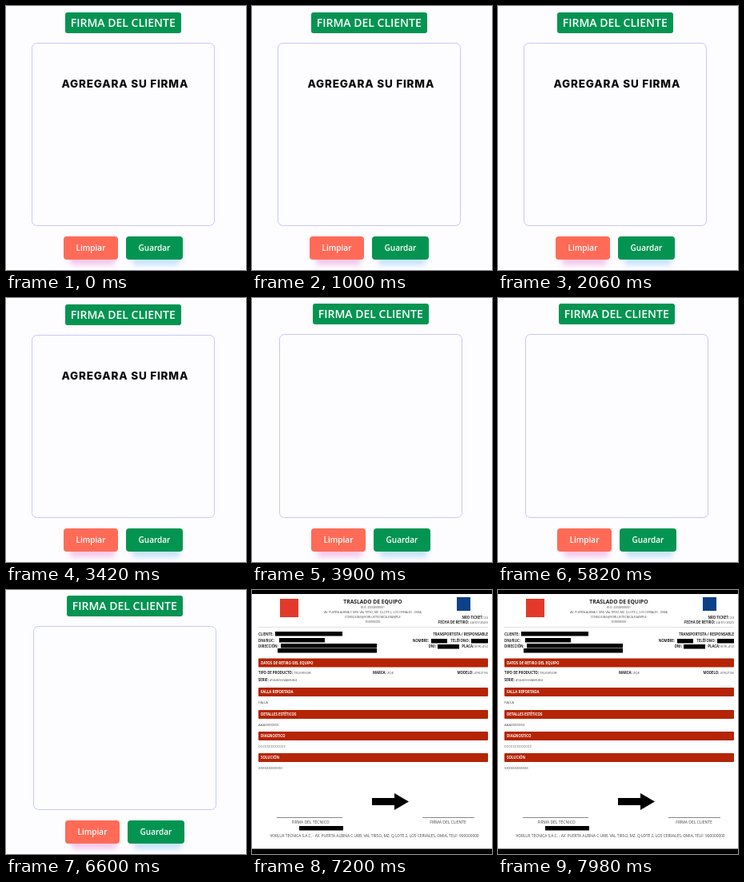
Write an HTML page that moves like this. It is 300 px wide and 330 px high and loops after 8 s.

```html
<!DOCTYPE html>
<html lang="es">
<head>
<meta charset="utf-8">
<title>Firma del cliente</title>
<style>
  html, body { margin: 0; width: 100%; height: 100%; overflow: hidden; background: #fdfcff; }
  svg { display: block; width: 300px; height: 330px; }
  .ui { font-family: "Open Sans", sans-serif; font-weight: 600; fill: #fff; }
  .prompt { font: 800 13.5px Inter, sans-serif; letter-spacing: .8px; fill: #080808; }
  #doc { font-family: "Open Sans", sans-serif; }
</style>
</head>
<body>
<svg id="stage" viewBox="0 0 300 330">
  <defs>
    <filter id="soft" x="-30%" y="-60%" width="160%" height="220%"><feGaussianBlur stdDeviation="3"/></filter>
  </defs>
  <g id="empty"></g>
  <g id="signed"></g>
  <g id="doc"></g>
</svg>
<script>
const LOOP = 8000;
const SCENES = [["empty", 0, 3500], ["signed", 3500, 7000], ["doc", 7000, LOOP]];

const byId = id => document.getElementById(id);

function add(parent, tag, attrs, content = "") {
  const node = document.createElementNS("http://www.w3.org/2000/svg", tag);
  for (const [key, value] of Object.entries(attrs)) node.setAttribute(key, value);
  node.textContent = content;
  parent.append(node);
  return node;
}

const box = (parent, x, y, width, height, fill, rx = 0, more = {}) =>
  add(parent, "rect", { x, y, width, height, fill, rx, ...more });

const caption = (parent, x, y, size, content) =>
  add(parent, "text", { x, y, "font-size": size, "text-anchor": "middle", class: "ui" }, content);

function button(parent, x, width, color, glow, label) {
  box(parent, x + 8, 306, width - 12, 18, glow, 4, { filter: "url(#soft)", opacity: .75 });
  box(parent, x, 288, width, 29, color, 4);
  caption(parent, x + width / 2, 305.5, 10, label);
}

// Signing form; the second scene sits slightly right and higher.
function form(parent, dx, dy) {
  box(parent, 0, 0, 300, 330, "#fdfcff");
  box(parent, 74 + dx, 8 + dy, 145, 26, "#049452", 3);
  caption(parent, 146.3 + dx, 26 + dy, 14, "FIRMA DEL CLIENTE");
  const top = 46.5 + dy;
  box(parent, 32.5 + dx, top, 228, 274.5 - top, "#fdfcff", 6, { stroke: "#c6c8fb" });
  button(parent, 72 + dx, 68, "#ff6b57", "#f3b8e4", "Limpiar");
  button(parent, 150 + dx, 71, "#049452", "#b4dcf8", "Guardar");
}

function drawDocument(g) {
  const write = (x, y, size, content, anchor = "start", weight = 400, fill = "#444") =>
    add(g, "text", { x, y, "font-size": size, "text-anchor": anchor, "font-weight": weight, fill }, content);

  function field(x, y, label, value = "", anchor = "start") {
    const line = write(x, y, 4.3, "", anchor);
    add(line, "tspan", { "font-weight": 700, fill: "#222" }, label);
    if (value) add(line, "tspan", {}, " " + value);
  }

  box(g, 0, 0, 300, 330, "#fff");
  box(g, 0, 0, 300, 5, "#000");
  box(g, 0, 323.5, 300, 6.5, "#000");

  box(g, 35, 11, 23, 23, "#e2392b");
  box(g, 256, 9, 17, 17, "#0c4188");

  write(151, 17, 6.7, "TRASLADO DE EQUIPO", "middle", 700, "#222");
  write(151, 23, 3.4, "RUC: 20000000001", "middle");
  write(151, 29, 3.5, "AV. PUERTA ALBINA C URB. VAL TIRSO, MZ. Q LOTE 2, LOS CERVALES - OMIA", "middle");
  write(151, 35, 3.7, "CONSULTAS@VORLUXTECNICA.EXAMPLE", "middle");
  write(151, 41, 3.7, "900000000", "middle");
  field(295, 36, "NRO TICKET:", "23", "end");
  field(295, 42, "FECHA DE RETIRO:", "24/01/2025", "end");
  box(g, 8, 46, 287, .6, "#cfcfdc");

  field(8, 57, "CLIENTE:");
  field(8, 65, "DNI/RUC:");
  field(8, 72, "DIRECCIÓN:");
  field(295, 57, "TRANSPORTISTA / RESPONSABLE", "", "end");
  field(221, 65, "NOMBRE:", "", "end");
  field(272, 65, "TELÉFONO:", "", "end");
  field(230, 72, "DNI:", "", "end");
  field(295, 72, "PLACA:", "B7K-41Z", "end");

  const redacted = [[29, 52, 84], [34, 60, 57], [36, 67, 120], [32, 73, 124],
    [224, 61, 20], [274, 61, 21], [232, 68, 27], [59, 295, 55]];
  for (const [x, y, width] of redacted) box(g, x, y, width, 5.5, "#000");

  const bands = [[85.5, "DATOS DE RETIRO DEL EQUIPO"], [122, "FALLA REPORTADA", "FALLA"],
    [150, "DETALLES ESTÉTICOS", "AAAXXXXXXX"], [177, "DIAGNOSTICO", "CCCCCCCCCCCCC"],
    [204, "SOLUCIÓN", "XXXXXXXXXXXX"]];
  for (const [y, heading, note] of bands) {
    box(g, 8, y, 287, 11, "#b52405", 1);
    write(11, y + 7.2, 4.4, heading, "start", 700, "#fff");
    if (note) write(8, y + 20, 4.3, note);
  }

  field(8, 104.5, "TIPO DE PRODUCTO:", "TELEVISOR");
  field(151, 104.5, "MARCA:", "ZQE");
  field(295, 104.5, "MODELO:", "47K2196", "end");
  field(8, 114, "SERIE:", "4564656SAMU84");

  add(g, "path", { d: "M150 260h28v-6l18 10.5-18 10.5v-6h-28z", fill: "#000" });
  box(g, 31, 284, 82, .7, "#555");
  box(g, 213, 284, 65, .7, "#555");
  write(73, 292, 5, "FIRMA DEL TÉCNICO", "middle");
  write(245, 292, 5, "FIRMA DEL CLIENTE", "middle");
  write(153, 309, 4.8, "VORLUX TECNICA S.A.C. - AV. PUERTA ALBINA C URB. VAL TIRSO, MZ. Q LOTE 2, LOS CERVALES, OMIA, TELF: 900000000", "middle");
}

form(byId("empty"), 0, 0);
add(byId("empty"), "text", { x: 148.8, y: 101.5, "text-anchor": "middle", class: "prompt" }, "AGREGARA SU FIRMA");
form(byId("signed"), 2, -1);
drawDocument(byId("doc"));

function show() {
  const time = performance.now() % LOOP;
  for (const [id, start, end] of SCENES)
    byId(id).style.display = time >= start && time < end ? "" : "none";
  requestAnimationFrame(show);
}
show();
</script>
</body>
</html>
```
